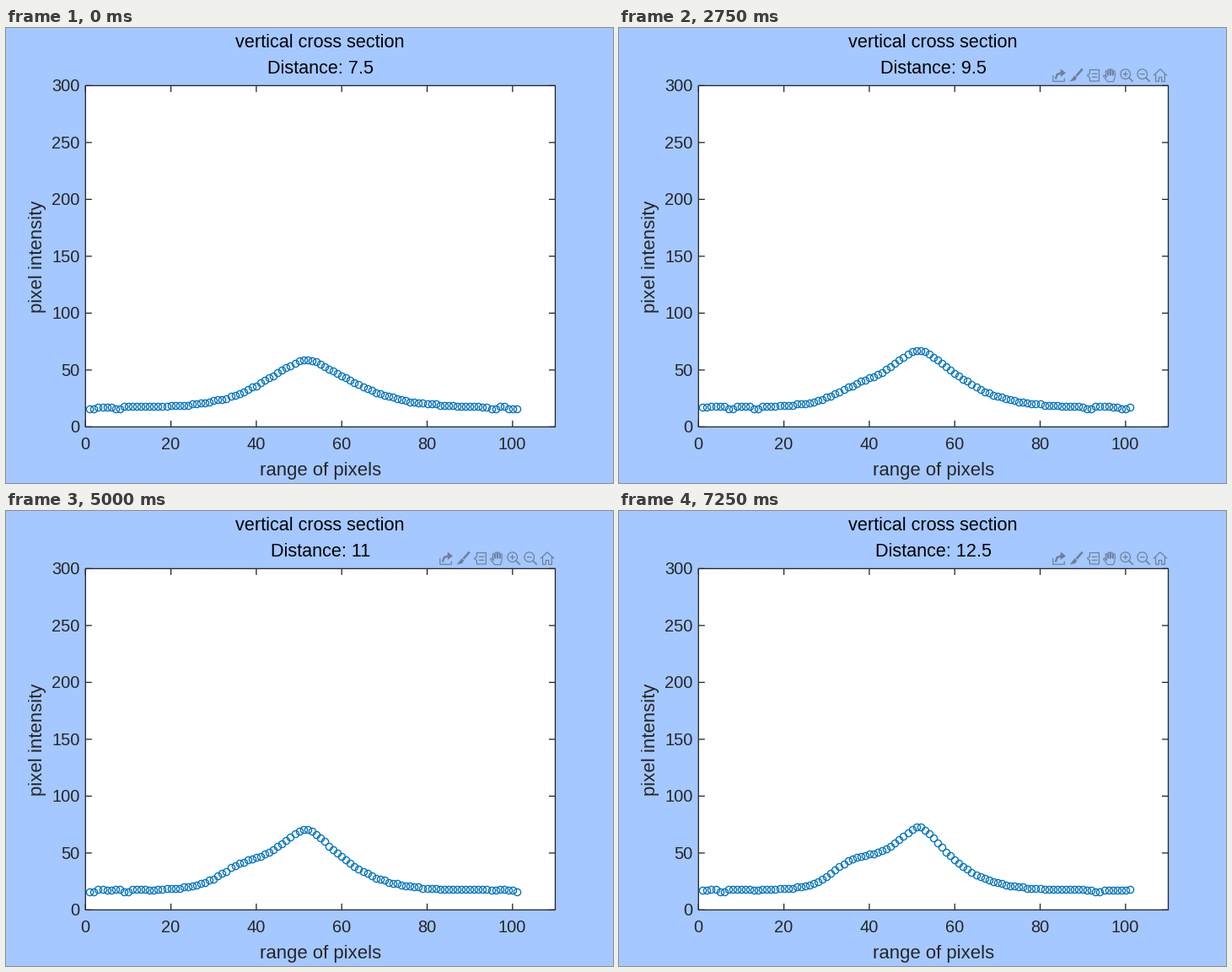
Recreate the animation shown at these times as a matplotlib script. Size 720 by 540 pixels, loop 8000 ms.

```python
import numpy as np
import matplotlib.pyplot as plt
from matplotlib.animation import FuncAnimation
from matplotlib.patches import Circle, Polygon, Rectangle

W, H, DPI = 720, 540, 100
BACK, INK, BLUE, GREY = "#a4c8ff", "#262626", "#0072bd", "#6f7f98"
LEFT, RIGHT, TOP, BOTTOM = 94.3, 651.5, 68.4, 473.4
TICK = 7.5
INTERVAL, HOLD, FRAMES = 250, 750, 32
PIXELS = np.arange(1, 102)

plt.rcParams["font.family"] = "Liberation Sans"


def px(n):
    """Pixels to points."""
    return n * 72 / DPI


fig = plt.figure(figsize=(W / DPI, H / DPI), dpi=DPI, facecolor=BACK)
ax = fig.add_axes([0, 0, 1, 1])
ax.set_xlim(0, W)
ax.set_ylim(H, 0)
ax.axis("off")


def sx(x):
    return LEFT + x * (RIGHT - LEFT) / 110


def sy(y):
    return BOTTOM - y * (BOTTOM - TOP) / 300


def label(x, y, text, size, color=INK, ha="center", rotation=0):
    return ax.text(x, y, text, fontsize=px(size), color=color, ha=ha,
                   va="baseline", rotation=rotation, rotation_mode="anchor")


def stroke(points, color=INK, width=1.3):
    xs, ys = zip(*points)
    return ax.plot(xs, ys, color=color, lw=px(width), snap=False,
                   solid_capstyle="butt", solid_joinstyle="miter")[0]


# Plot box, ticks and labels
ax.add_patch(Rectangle((LEFT, TOP), RIGHT - LEFT, BOTTOM - TOP,
                       fc="white", ec=INK, lw=px(1.3), snap=False))
for v in range(0, 101, 20):
    x = sx(v)
    stroke([(x, BOTTOM), (x, BOTTOM - TICK)])
    stroke([(x, TOP), (x, TOP + TICK)])
    label(x - 0.5, 500.3, str(v), 20)
for v in range(0, 301, 50):
    y = sy(v)
    stroke([(LEFT, y), (LEFT + TICK, y)])
    stroke([(RIGHT, y), (RIGHT - TICK, y)])
    label(87.8, y + 6.7, str(v), 20, ha="right")

label(373, 531.3, "range of pixels", 22.1)
label(43.5, 271, "pixel intensity", 22.2, rotation=90)
label(372.7, 23.3, "vertical cross section", 21.7, "black")
title = label(372.7, 54.3, "", 21.7, "black")

# Toolbar above the plot
tools = []


def line(*points, width=1.2):
    tools.append(stroke(points, GREY, width))


def shape(*points):
    tools.append(ax.add_patch(Polygon(points, fc=GREY, ec="none")))


def share(x):
    line((x, 56), (x, 63.3), (x + 13.5, 63.3), (x + 13.5, 59.5))
    line((x + 3, 60.5), (x + 5, 55), (x + 10, 53.3), width=2.4)
    shape((x + 9, 48.5), (x + 15.2, 53.3), (x + 9, 58))


def brush(x):
    line((x + 15.3, 48.6), (x + 8, 56.8), width=2.6)
    shape((x + 6, 56.2), (x + 8.7, 58.6), (x + 6.8, 62), (x, 63.6),
          (x + 3, 60))


def data_tip(x):
    line((x + 14, 49.6), (x + 3, 49.6), (x + 3, 54), (x, 56.3),
         (x + 3, 58.7), (x + 3, 63), (x + 14, 63), (x + 14, 49.6))
    for y in (54.3, 58.3):
        line((x + 5.5, y), (x + 12, y))


def hand(x):
    fingers = []
    for k in range(4):
        left, tip = x + 2.7 + 3 * k, 48.8 + 0.9 * (k - 1.5) ** 2
        fingers += [(left + 0.3, 56), (left, tip), (left + 1.9, tip),
                    (left + 2.2, 56)]
    line((x + 5, 63.6), (x, 57), (x + 1.5, 56), (x + 4, 58.5), *fingers,
         (x + 13.5, 59), (x + 12, 63.6), (x + 5, 63.6), width=1.1)


def magnifier(x, plus):
    tools.append(ax.add_patch(Circle((x, 54.7), 5.8, fill=False, ec=GREY,
                                     lw=px(1.2))))
    line((x + 4.2, 58.9), (x + 9, 63.7), width=1.6)
    line((x - 3, 54.7), (x + 3, 54.7))
    if plus:
        line((x, 51.7), (x, 57.7))


def home(x):
    line((x - 8, 56.5), (x, 48.8), (x + 8, 56.5))
    for side in (-1, 1):
        line((x + 5.4 * side, 54.5), (x + 5.4 * side, 63.4),
             (x + 1.7 * side, 63.4), (x + 1.7 * side, 58.5), (x, 58.5))


share(514.8)
brush(534.5)
data_tip(555.4)
hand(574.5)
magnifier(600.7, True)
magnifier(620.7, False)
home(642)


def profile(dist):
    """A peak that grows and narrows, with a shoulder rising on its left."""
    s = (dist - 7.5) / 5
    height = 41.5 + 26 * s - 11.5 * s ** 2
    power = 1.57 - 0.17 * s
    d = PIXELS - 51.5
    width = np.where(d < 0, 13.4 - 1.3 * s, 14.9 - 4.4 * s)
    peak = height * np.exp(-(np.abs(d) / width) ** power)
    shoulder = 13.5 * s * np.exp(-((PIXELS - 36) / 6.3) ** 2)

    # the flat ends flicker by a level or two, in short runs
    rng = np.random.default_rng(int(dist * 2))
    dips = np.repeat(rng.choice([0, 0, 1, 1.6], 51), 2)[:PIXELS.size]
    dips[np.abs(PIXELS - 53) < 37] = 0
    return np.round(17.6 + peak + shoulder - dips)


dots, = ax.plot([], [], "o", ms=px(8.2), mfc="none", mec=BLUE, mew=px(1.35))


def update(i):
    step = (i + 1) * INTERVAL // HOLD
    dist = 7.5 + 0.5 * step
    title.set_text(f"Distance: {dist:g}")
    dots.set_data(sx(PIXELS), sy(profile(dist)))
    for part in tools:
        part.set_visible(step > 0)
    return [title, dots, *tools]


anim = FuncAnimation(fig, update, frames=FRAMES, interval=INTERVAL,
                     repeat=True, repeat_delay=0)
plt.show()
```
